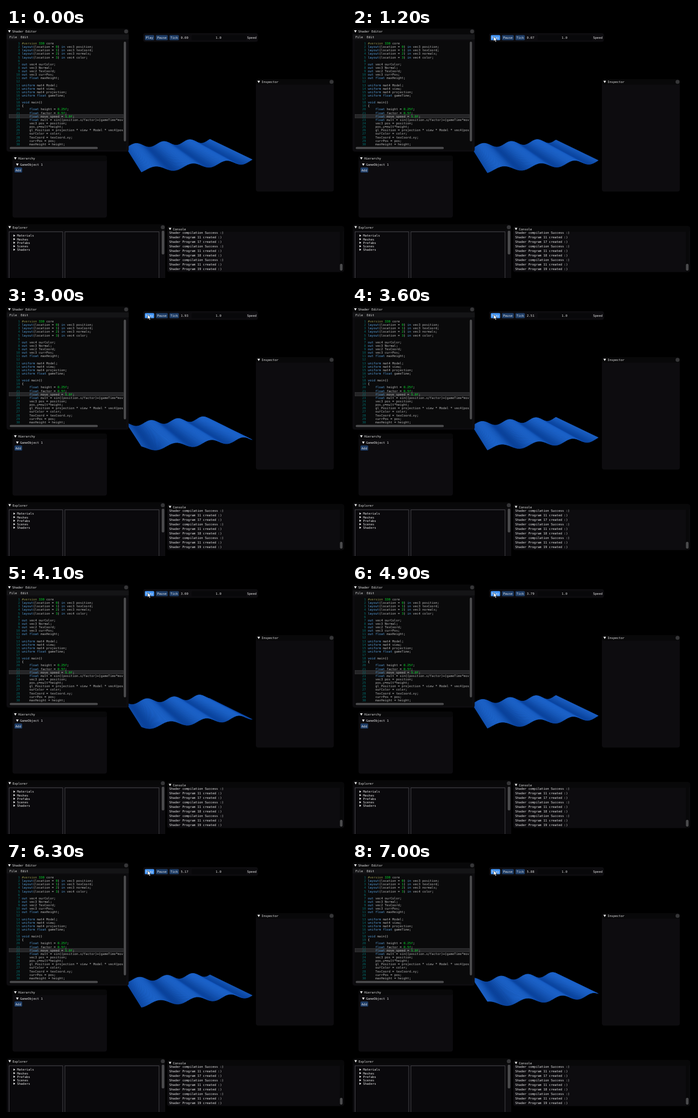
An HTML page with a canvas that plays this animation: 600 px wide and 441 px high, repeating every 7100 ms.

```html
<!DOCTYPE html>
<html lang="en">
<head>
<meta charset="utf-8">
<title>Shader Editor</title>
<style>
  html, body { margin: 0; width: 100%; height: 100%; overflow: hidden; background: #000; }
  canvas, svg { position: absolute; left: 0; top: 0; width: 600px; height: 441px; }
  text {
    font: 5.5px "DejaVu Sans Mono", "Liberation Mono", monospace;
    fill: #e4e4e4;
    white-space: pre;
    text-rendering: geometricPrecision;
  }
  .kw { fill: #569cd6; }
  .num { fill: #06e62c; }
  .pre { fill: #90904c; }
  .id { fill: #b4b4b4; }
  .line { fill: #007070; text-anchor: end; }
  .mid { text-anchor: middle; }
</style>
</head>
<body>
<canvas id="scene" width="600" height="441"></canvas>
<svg id="ui" viewBox="0 0 600 441"></svg>
<script>
const LOOP = 7100, STEP = 100;
const PANEL = '#0d0c0f', BUTTON = '#1d3c66', HOVER = '#4296fa', GRIP = '#4b4b4d';
const ui = document.getElementById('ui');
const ctx = document.getElementById('scene').getContext('2d');

function add(tag, attrs, parent = ui) {
  const el = document.createElementNS('http://www.w3.org/2000/svg', tag);
  for (const key in attrs) el.setAttribute(key, attrs[key]);
  return parent.appendChild(el);
}

const box = (x, y, width, height, fill, rx = 0, extra = {}) =>
  add('rect', { x, y, width, height, fill, rx, ...extra });

function label(x, y, str, cls = '', parent = ui) {
  const el = add('text', { x, y: y + 2, class: cls }, parent);
  el.textContent = str;
  return el;
}

const arrowDown = (x, y) =>
  add('path', { d: `M${x - 2.3} ${y - 2}h4.6l-2.3 4.2z`, fill: '#eee' });
const arrowRight = (x, y) =>
  add('path', { d: `M${x - 1.4} ${y - 2}v4l3.2 -2z`, fill: '#eee' });

function panel(x, y, w, h, title, titleY, closeX) {
  box(x, y, w, h, PANEL, 4);
  box(x, y, w, titleY - y + 5, '#080809', 4);
  arrowDown(x + 5, titleY);
  label(x + 10, titleY, title);
  if (closeX) add('circle', { cx: closeX, cy: titleY, r: 3.5, fill: '#363638' });
}

function button(x, y, w, str) {
  const rect = box(x, y, w, 9, BUTTON, 1.5);
  label(x + w / 2, y + 4.5, str, 'mid');
  return rect;
}

// Shader editor
const code = `#version 330 core
layout(location = 0) in vec3 position;
layout(location = 1) in vec3 texCoord;
layout(location = 2) in vec3 normals;
layout(location = 3) in vec4 color;

out vec4 ourColor;
out vec3 Normal;
out vec2 TexCoord;
out vec3 currPos;
out float maxHeight;

uniform mat4 Model;
uniform mat4 view;
uniform mat4 projection;
uniform float gameTime;

void main()
{
    float height = 0.25f;
    float factor = 0.5f;
    float move_speed = 5.0f;
    float mult = sin((position.x/factor)+(gameTime*move_speed));
    vec3 pos = position;
    pos.y=mult*height;
    gl_Position = projection * view * Model * vec4(pos, 1.0);
    ourColor = color;
    TexCoord = texCoord.xy;
    currPos = pos;
    maxHeight = height;`.split('\n');

function tokenClass(tok) {
  if (/^#/.test(tok)) return 'pre';
  if (/^(float|void|layout|in|out|uniform)$/.test(tok)) return 'kw';
  if (/^\d/.test(tok)) return 'num';
  return /^\w/.test(tok) ? 'id' : '';
}

function drawEditor() {
  panel(1, 1, 215.5, 217, 'Shader Editor', 6, 212);
  box(1, 11.5, 215.5, 8.5, '#141416');
  label(6, 15.5, 'File');
  label(26, 15.5, 'Edit');
  box(5, 22, 207, 193, '#0a0a0b');
  box(5.5, 152.6, 201.5, 6.2, '#252527', 0, { stroke: '#414143', 'stroke-width': 0.6 });
  const clip = add('clipPath', { id: 'code' });
  add('rect', { x: 5, y: 22, width: 202, height: 187 }, clip);
  const view = add('g', { 'clip-path': 'url(#code)' });
  code.forEach((src, i) => {
    const y = 27 + i * 6.13;
    label(24.5, y, i + 1, 'line', view);
    const row = label(28, y, '', '', view);
    for (const tok of src.match(/#\w+|\d[\w.]*|\w+|\s+|[^\w\s]+/g) || [])
      add('tspan', { class: tokenClass(tok) }, row).textContent = tok;
  });
  box(207.8, 24, 4, 176, GRIP, 2);
  box(6.5, 209.8, 155.5, 3.8, GRIP, 1.9);
}

function drawSidePanels() {
  panel(441, 90.5, 137.5, 198, 'Inspector', 95, 574.5);
  panel(11.5, 225, 166.5, 109.5, 'Hierarchy', 230);
  arrowDown(20, 241);
  label(25, 241, 'GameObject 1');
  button(15, 246, 13.5, 'Add');
}

function drawExplorer() {
  panel(1.5, 346.5, 279.5, 100, 'Explorer', 351.5, 276.7);
  const frame = { stroke: '#48484d', 'stroke-width': 0.9 };
  box(5.5, 359.5, 94.5, 90, '#0a090c', 0, frame);
  box(104, 359.5, 166, 90, '#0a090c', 0, frame);
  box(274.8, 357.5, 4.6, 42, GRIP, 2.2);
  ['Materials', 'Meshes', 'Prefabs', 'Scenes', 'Shaders'].forEach((name, i) => {
    const y = 366.3 + i * 6.2;
    arrowRight(14.6, y);
    label(19.4, y, name);
  });
}

function drawConsole() {
  panel(284.5, 349.5, 312, 81, 'Console', 354.5);
  const done = 'Shader compilation Success :)';
  const made = n => `Shader Program ${n} created :)`;
  [done, made(11), made(17), done, made(11), made(18), done, made(11), made(19)]
    .forEach((str, i) => label(288, 361 + i * 8, str));
  box(589, 359, 5.5, 70, '#080809');
  box(589.3, 416, 4.6, 12, GRIP, 2);
}

drawEditor();
drawSidePanels();
drawExplorer();
drawConsole();

// Toolbar
box(242, 9, 202.5, 15.5, PANEL, 4);
const play = button(245, 12.5, 16.5, 'Play');
button(264.5, 12.5, 21, 'Pause');
button(288.5, 12.5, 16.5, 'Tick');
const clock = label(308.5, 17, '');
box(327.5, 12.5, 96.5, 9, '#08080a', 1.5);
label(375, 17, '1.0', 'mid');
label(425.5, 17, 'Speed');

const cursor = add('path', {
  d: 'M0 0v8.2l1.9-1.7 1.3 3 1.5-.6-1.3-3h2.6z',
  fill: '#fff', stroke: '#000', 'stroke-width': 0.5
});

// Game clock: [ms, seconds]
const clockKeys = [[0, 0], [1130, 0], [1200, 0.07], [2200, 1.08], [3000, 1.93],
  [4100, 3], [5700, 4.57], [7000, 5.88], [7100, 5.98]];

function gameTime(ms) {
  const i = clockKeys.findIndex(k => k[0] > ms);
  const [t0, v0] = clockKeys[i - 1], [t1, v1] = clockKeys[i];
  return v0 + (v1 - v0) * (ms - t0) / (t1 - t0);
}

// Plane corners on screen: x, y and height of one wave amplitude
const front = [[239, 251.3, 5.3], [434.5, 234.5, 4.5]];
const back = [[212, 209, 4.3], [360, 198.3, 3.9]];

// Perspective-correct point on an edge, lifted by h
function edgePoint([a, b], u, h) {
  const wa = (1 - u) / a[2], wb = u / b[2], w = wa + wb;
  return [(a[0] * wa + b[0] * wb) / w, (a[1] * wa + b[1] * wb - h) / w];
}

function drawWave(time) {
  const n = 160;
  const phase = u => 10 - 20 * u + time * 5;
  ctx.clearRect(0, 0, 600, 441);
  ctx.lineWidth = 0.6;
  for (let i = n - 1; i >= 0; i--) {
    const u0 = i / n, u1 = (i + 1) / n;
    const h0 = Math.sin(phase(u0)), h1 = Math.sin(phase(u1));
    const mid = phase((u0 + u1) / 2);
    const lit = 0.52 + 0.28 * Math.sin(mid) - 0.14 * Math.cos(mid);
    ctx.fillStyle = ctx.strokeStyle =
      `rgb(${6 + 28 * lit},${60 + 50 * lit},${148 + 70 * lit})`;
    ctx.beginPath();
    ctx.moveTo(...edgePoint(front, u0, h0));
    ctx.lineTo(...edgePoint(back, u0, h0));
    ctx.lineTo(...edgePoint(back, u1, h1));
    ctx.lineTo(...edgePoint(front, u1, h1));
    ctx.closePath();
    ctx.fill();
    ctx.stroke();
  }
}

function render(ms) {
  const time = gameTime(ms);
  drawWave(time);
  clock.textContent = time.toFixed(2);
  const p = Math.min(1, ms / 850), ease = p * p * (3 - 2 * p);
  cursor.setAttribute('transform',
    `translate(${602 - 352 * ease} ${443 - 428 * ease})`);
  play.setAttribute('fill', p === 1 ? HOVER : BUTTON);
}

const start = performance.now();
let shown = -1;
function tick() {
  const ms = Math.floor(((performance.now() - start) % LOOP) / STEP) * STEP;
  if (ms !== shown) render(shown = ms);
  requestAnimationFrame(tick);
}
tick();
</script>
</body>
</html>
```
